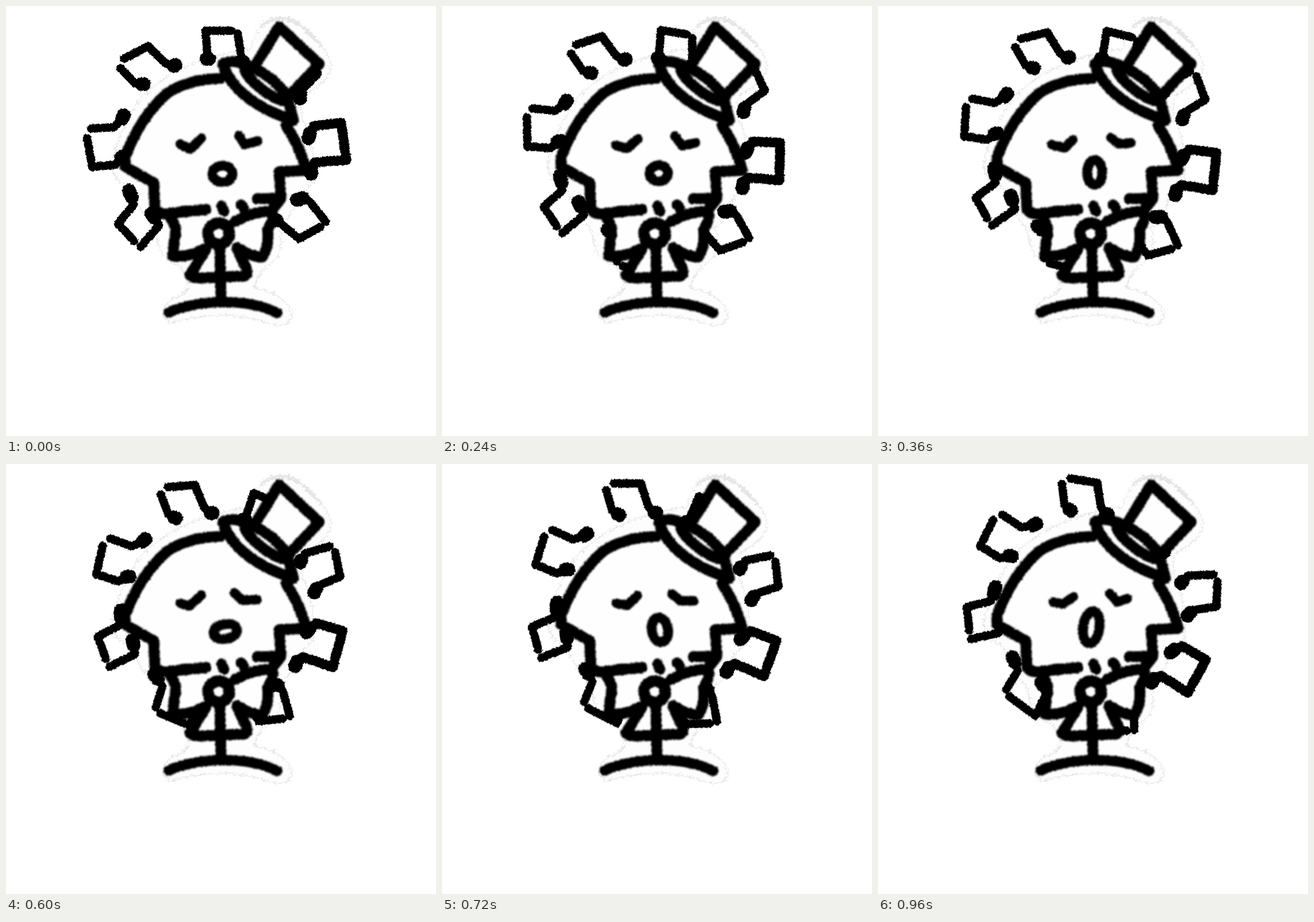
Write an HTML page without scripts that moves like this. It is 748 px wide and 748 px high and loops after 1080 ms.

```html
<!DOCTYPE html>
<html lang="en">
<head>
<meta charset="utf-8">
<title>Singing head with circling notes</title>
<style>
  html, body { margin: 0; width: 100%; height: 100%; overflow: hidden; background: #fff; }
  svg { display: block; width: 100vw; height: 100vh; }
  path, rect { stroke-linecap: round; stroke-linejoin: round; }
  filter { color-interpolation-filters: sRGB; }
  .ink { fill: none; stroke: #000; stroke-width: 19; }
  .notes { fill: none; stroke: #000; stroke-width: 14.5; }
  .heads { stroke-width: 24; }
  .paper { fill: #fefefe; stroke: none; }

  .notes { transform-origin: 370px 253px; animation: orbit 1080ms steps(9) infinite; }
  @keyframes orbit { to { transform: rotate(41.4deg); } }

  .mouth {
    fill: #fff; stroke: #000; stroke-width: 17;
    transform-box: fill-box; transform-origin: center;
    animation: sing 1080ms step-end infinite;
  }
  @keyframes sing {
    0%      { x: 359px; y: 278px; width: 35px; height: 28px; rx: 16px; ry: 14px; fill: #fff; }
    11.111% { x: 355px; y: 287px; width: 43px; height: 17px; rx: 3px; ry: 3px; fill: #111; }
    22.222% { x: 361px; y: 277px; width: 32px; height: 28px; rx: 16px; ry: 14px; fill: #fff; }
    33.333% { x: 364px; y: 268px; width: 26px; height: 43px; rx: 13px; ry: 20px; }
    44.444% { x: 363px; y: 273px; width: 32px; height: 34px; rx: 16px; ry: 17px; transform: none; }
    55.555% { x: 361px; y: 279px; width: 41px; height: 25px; rx: 18px; ry: 12px; transform: rotate(-10deg); }
    66.666% { x: 365px; y: 267px; width: 28px; height: 43px; rx: 14px; ry: 20px; transform: rotate(-10deg); }
    77.777% { x: 361px; y: 262px; width: 28px; height: 49px; rx: 14px; ry: 24px; transform: none; }
    88.888% { x: 357px; y: 256px; width: 28px; height: 56px; rx: 14px; ry: 26px; transform: rotate(8deg); }
  }

  .eyes { stroke-width: 16.5; animation: look 1080ms step-end infinite; }
  @keyframes look {
    0%      { d: path("M303 240L321 249L340 230M405 225L415 241L438 235"); }
    11.111% { d: path("M302 242L322 248L341 231M405 226L418 243L441 238"); }
    33.333% { d: path("M302 241L325 247L339 233M405 229L419 240L440 238"); }
    55.555% { d: path("M303 242L319 247L340 228M397 224L411 237L437 236"); }
    66.666% { d: path("M303 242L322 246L340 229M400 226L415 238L438 238"); }
    88.888% { d: path("M305 240L321 244L340 231M403 225L417 240L434 234"); }
  }
</style>
</head>
<body>
<svg viewBox="0 0 748 748" role="img" aria-label="A singing head in a top hat with notes circling it">
  <defs>
    <filter id="chalk" filterUnits="userSpaceOnUse" x="0" y="0" width="748" height="748">
      <feTurbulence type="fractalNoise" baseFrequency=".3" numOctaves="2" seed="4"/>
      <feDisplacementMap in="SourceGraphic" scale="4" xChannelSelector="R" yChannelSelector="G"/>
      <feGaussianBlur stdDeviation="1.4"/>
    </filter>
    <filter id="rough" filterUnits="userSpaceOnUse" x="0" y="0" width="748" height="748">
      <feTurbulence type="fractalNoise" baseFrequency=".3" numOctaves="2" seed="9"/>
      <feDisplacementMap in="SourceGraphic" scale="4" xChannelSelector="R" yChannelSelector="G"/>
      <feGaussianBlur stdDeviation=".5"/>
    </filter>
    <filter id="dust" filterUnits="userSpaceOnUse" x="0" y="0" width="748" height="748">
      <feTurbulence type="fractalNoise" baseFrequency=".2" numOctaves="3" seed="2"/>
      <feDisplacementMap in="SourceGraphic" scale="13" xChannelSelector="R" yChannelSelector="G"/>
      <feGaussianBlur stdDeviation=".5"/>
    </filter>
  </defs>

  <!-- smudged paper behind the drawing -->
  <g filter="url(#dust)" fill="none" stroke="#e6e6e6">
    <path fill="#fdfdfd" stroke-width="2" d="M425 75Q432 45 450 30Q480 5 520 38Q565 78 566 108Q552 140 522 152Q505 172 520 205Q540 255 532 312Q508 325 502 348Q490 375 475 385Q484 425 470 440Q438 460 432 490Q485 500 498 535Q495 558 470 556Q380 522 285 552Q265 535 285 512Q312 502 318 488Q308 455 300 452Q265 440 260 390Q225 345 215 315Q178 300 186 265Q205 190 245 150Q310 90 425 75Z"/>
    <path stroke-width="6" d="M445 34Q480 6 520 40L548 68"/>
  </g>

  <g class="notes">
    <g filter="url(#rough)">
      <path d="M199 108L224 134L239 136M205 92L247 70L278 100L294 103"/>
      <path class="heads" d="M236 136h4M292 104l3-1"/>

      <path d="M351 92L347 43H392M403 48L410 92"/>
      <path class="heads" d="M349 92h4M409 97h3"/>

      <g transform="rotate(-27.6 370 253)">
        <path d="M519 180L528 168L571 159M580 170L585 213L545 226L540 235"/>
        <path class="heads" d="M518 183l2-4M538 237l4-6"/>
      </g>

      <path stroke-width="17" d="M527 228L535 209L583 203L592 268L537 272L531 290"/>
      <path class="heads" d="M526 230l3-9M531 292v-9"/>

      <path d="M510 335L527 339L556 375M547 384L510 405L475 376L465 368"/>
      <path class="heads" d="M506 337l10-3M466 371l5 2"/>

      <g transform="rotate(-36.8 370 253)">
        <path d="M236 340L243 360L223 392M228 404L274 438L293 400L284 382"/>
        <path class="heads" d="M234 336l4 9M284 380l4 6"/>
      </g>

      <path d="M217 325L222 345L195 379L223 409M234 419L266 382L258 365"/>
      <path class="heads" d="M214 321l5 12M253 361l5 7"/>

      <path d="M148 213L188 211L204 193M141 230L150 280L190 276L203 262"/>
      <path class="heads" d="M202 196l3-6M200 264l5-3"/>
    </g>
  </g>

  <g filter="url(#chalk)">
    <!-- white bodies that hide passing notes -->
    <path class="paper" d="M372 126Q315 128 280 152Q232 195 207 264V280L258 308V355L285 370L296 395L290 435L345 424L320 470L418 470L402 422L445 437L466 355L437 334H478L475 287H522Q515 245 487 208Z"/>
    <path class="paper" d="M378 102L432 102L475 36L546 100L492 155L500 200Q400 165 378 102Z"/>

    <!-- head -->
    <path class="ink" d="M372 126Q315 128 280 152Q232 195 207 264V279L257 308L259 352Q265 366 290 360L348 354"/>
    <path class="ink" d="M487 208Q512 245 522 286L475 288L478 335H437M478 335L462 356"/>
    <path class="ink" d="M375 348l4 9M409 346l4 5"/>

    <!-- hat -->
    <path class="ink" d="M418 102Q392 92 377 101Q398 165 500 199L490 160"/>
    <ellipse class="ink" cx="452" cy="135" rx="46" ry="12" transform="rotate(38 452 135)"/>
    <path class="ink" d="M433 104L475 36L545 101L493 156"/>

    <!-- bow, collar and stand -->
    <path class="ink" d="M287 370Q300 388 293 405L290 435Q318 438 348 421"/>
    <path class="ink" d="M398 375Q430 357 462 357Q468 368 455 389Q458 420 445 437Q425 436 402 420"/>
    <path class="ink" d="M347 425L320 468Q322 474 345 473L405 470Q424 472 418 456L402 423"/>
    <path class="ink" d="M372 415L374 514"/>
    <path class="ink" style="stroke-width:18" d="M283 533Q325 515 378 515Q435 515 472 534"/>
    <circle cx="370" cy="396" r="18.5" fill="#fff" stroke="#000" stroke-width="20"/>

    <!-- face -->
    <path class="ink eyes" d="M303 240L321 249L340 230M405 225L415 241L438 235"/>
    <rect class="mouth" x="359" y="278" width="35" height="28" rx="16"/>
  </g>
</svg>
</body>
</html>
```
